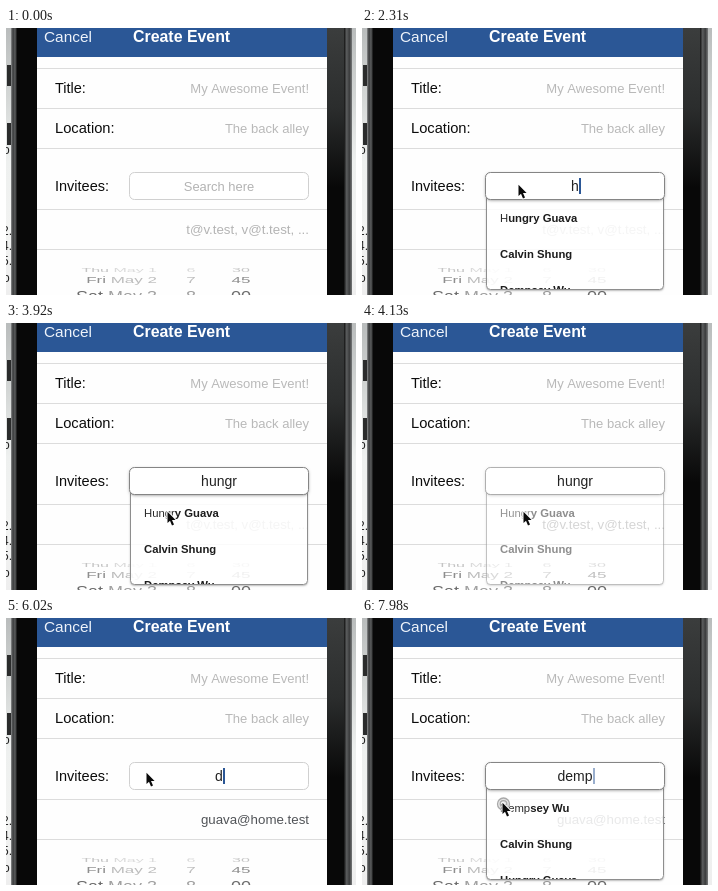
Write an HTML page with a canvas that moves like this. It is 350x267 px and loops after 8 s.

```html
<!DOCTYPE html>
<html lang="en">
<head>
<meta charset="utf-8">
<title>Create Event</title>
<style>
html, body { margin: 0; width: 100%; height: 100%; overflow: hidden; background: #fff; }
canvas { display: block; width: 350px; height: 267px; }
</style>
</head>
<body>
<canvas id="stage"></canvas>
<script>
const W = 350, H = 267, LOOP = 8000, STEP = 70;
const LEFT = 31, SCREEN = 290;
const FONT = '"Liberation Sans", Arial, sans-serif';
const canvas = document.getElementById('stage');
const ctx = canvas.getContext('2d');
const dpr = window.devicePixelRatio || 1;
canvas.width = W * dpr;
canvas.height = H * dpr;

const GUAVA = 'Hungry Guava', CALVIN = 'Calvin Shung', DEMPSEY = 'Dempsey Wu';

// Each search: focus time, key times, list opening and closing.
const searches = [
  { focus: 1750, keys: [2170, 2380, 2520, 2660, 3080], word: 'hungr',
    open: 2240, close: 4060, end: 4200, names: [GUAVA, CALVIN, DEMPSEY] },
  { focus: 5390, keys: [5950, 6370, 6790, 7350], word: 'demp',
    open: 6160, close: 9000, end: 9000, names: [DEMPSEY, CALVIN, GUAVA] }
];
const clicks = [[1540, 1750], [3990, 4130], [5250, 5390], [7910, 8000]];
// Pointer moves: start, end, from x, y, to x, y
const moves = [
  [840, 1050, 33, 161, 156, 156],
  [3360, 3710, 156, 156, 161, 188],
  [4340, 4690, 161, 188, 136, 155],
  [5530, 5740, 136, 155, 140, 154],
  [6930, 7420, 140, 154, 140, 184]
];

const clamp = v => Math.max(0, Math.min(1, v));
const ramp = (t, a, b) => clamp((t - a) / (b - a));
const smooth = p => p * p * (3 - 2 * p);

function rect(x, y, w, h, color) {
  ctx.fillStyle = color;
  ctx.fillRect(x, y, w, h);
}

function text(str, x, y, size, color, align = 'left', weight = 400) {
  ctx.font = `${weight} ${size}px ${FONT}`;
  ctx.textAlign = align;
  ctx.fillStyle = color;
  ctx.fillText(str, x, y);
}

// The shadow is kept outside the shape so that see-through fills stay clean.
function box(x, y, w, h, radii, fill, stroke, shadow) {
  const shape = new Path2D();
  shape.roundRect(x, y, w, h, radii);
  if (shadow) {
    const outside = new Path2D(shape);
    outside.rect(0, 0, W, H);
    ctx.save();
    ctx.clip(outside, 'evenodd');
    ctx.shadowColor = 'rgba(0,0,0,.4)';
    ctx.shadowBlur = shadow * dpr;
    ctx.shadowOffsetY = dpr;
    ctx.fillStyle = '#fff';
    ctx.fill(shape);
    ctx.restore();
  }
  ctx.fillStyle = fill;
  ctx.fill(shape);
  ctx.strokeStyle = stroke;
  ctx.lineWidth = 1;
  ctx.stroke(shape);
}

function gradient(x0, y0, x1, y1, colors) {
  const g = ctx.createLinearGradient(x0, y0, x1, y1);
  colors.forEach((c, i) => g.addColorStop(i / (colors.length - 1), c));
  return g;
}

function drawDesk() {
  rect(0, 0, W, H, gradient(0, 0, 0, H, ['#b9bcbc', '#d3d6d5', '#eef0ef', '#f2f3f2', '#eeeeee']));
  text('o', -3, 126, 12, '#222');
  ['2.', '4.', '5.'].forEach((s, i) => text(s, -4, 207 + i * 15, 12, '#222'));
  text('o', -3, 254, 12, '#222');
  rect(1, 37, 6, 21, '#2b2c2c');
  rect(1, 95, 6, 22, '#2b2c2c');
  rect(5, 0, 6, H, gradient(5, 0, 11, 0, ['#8b8d8e', '#3a3b3c', '#5c5e5f', '#111']));
  rect(11, 0, 328, H, '#080808');
  rect(321, 0, 17, H, gradient(0, 0, 0, 160, ['#3b3d3d', '#2b2d2d', '#080808']));
  rect(338, 0, 8, H, gradient(338, 0, 346, 0, ['#111', '#5c5e5f', '#3a3b3c', '#77797a']));
}

function wheelRow(weekday, date, hour, minute, y, size, squash, dark, light) {
  ctx.save();
  ctx.translate(0, y);
  ctx.scale(1, squash);
  text(date, 151, 0, size, light, 'right');
  text(weekday, 151 - ctx.measureText(' ' + date).width, 0, size, dark, 'right');
  text(hour, 185, 0, size, light, 'center');
  text(minute, 235, 0, size, dark, 'center');
  ctx.restore();
}

function drawForm(t) {
  rect(LEFT, 0, SCREEN, H, '#fefefe');
  rect(LEFT, 0, SCREEN, 29, '#2b5796');
  text('Cancel', 38, 13.5, 15.4, '#eef3fa');
  text('Create Event', 127, 13.5, 15.9, '#fff', 'left', 700);
  [40, 80, 120, 181, 221].forEach(y => rect(LEFT, y, SCREEN, 1, '#dcdcdc'));

  text('Title:', 49, 65, 14.5, '#0c0c0c');
  text('Location:', 49, 105, 14.7, '#0c0c0c');
  text('Invitees:', 49, 163, 14.5, '#0c0c0c');
  text('My Awesome Event!', 303, 65, 13.05, '#b9b9b9', 'right');
  text('The back alley', 303, 105, 13.05, '#b9b9b9', 'right');
  if (t < 4200) text('t@v.test, v@t.test, ...', 303, 206, 13.3, '#b4b4b4', 'right');
  else text('guava@home.test', 303, 206, 13.3, '#505357', 'right');

  ctx.save();
  ctx.beginPath();
  ctx.rect(LEFT, 240, SCREEN, 27);
  ctx.clip();
  wheelRow('Thu', 'May 1', '6', '30', 244, 16, .34, '#c4c4c4', '#dadada');
  wheelRow('Fri', 'May 2', '7', '45', 255, 17, .58, '#8e8e8e', '#bcbcbc');
  wheelRow('Sat', 'May 3', '8', '00', 273, 18, .85, '#6c6c6c', '#a0a0a0');
  ctx.restore();
}

function drawList(names, typed, alpha) {
  ctx.save();
  ctx.globalAlpha = alpha;
  box(124.5, 170.5, 177, 91, [0, 0, 4, 4], 'rgba(255,255,255,.87)', '#8e8e8e', 2);
  ctx.beginPath();
  ctx.rect(125, 172, 176, 89);
  ctx.clip();
  names.forEach((name, i) => {
    const n = name.toLowerCase().startsWith(typed) ? typed.length : 0;
    const y = 194 + i * 36, head = name.slice(0, n);
    text(head, 138, y, 11.3, '#2a2a2a');
    const dx = ctx.measureText(head).width;
    text(name.slice(n), 138 + dx, y, 11.3, '#1d1d1d', 'left', 700);
  });
  ctx.restore();
}

function drawField(t) {
  const s = searches.find(q => t >= q.focus && t < q.end);
  const typed = s ? s.word.slice(0, s.keys.filter(k => t >= k).length) : '';
  const alpha = s ? ramp(t, s.open - STEP, s.open + STEP) * (1 - ramp(t, s.close, s.end)) : 0;

  if (alpha) drawList(s.names, typed, alpha);
  box(123.5, 144.5, 179, 27, 5, '#fff', '#d0d0d0');
  if (alpha) {
    ctx.save();
    ctx.globalAlpha = alpha;
    box(123.5, 144.5, 179, 27, 5, '#fff', '#858585', 3);
    ctx.restore();
  }
  if (typed) text(typed, 213, 163, 14, '#222', 'center');
  else text('Search here', 213, 163, 12.95, '#b3b3b3', 'center');

  if (s && t < s.close) {
    ctx.font = `400 14px ${FONT}`;
    const x = 213 + ctx.measureText(typed).width / 2;
    const last = Math.max(s.focus, ...s.keys.filter(k => t >= k));
    const phase = (t - last) % 1000;
    ctx.globalAlpha = Math.max(1 - ramp(phase, 500, 750), ramp(phase, 920, 1000));
    rect(Math.round(x), 150, 2, 16, '#2b5796');
    ctx.globalAlpha = 1;
  }
}

function drawPointer(t) {
  if (t < moves[0][0]) return;
  const m = moves.filter(q => t >= q[0]).pop();
  const p = smooth(ramp(t, m[0], m[1]));
  const x = m[2] + (m[4] - m[2]) * p, y = m[3] + (m[5] - m[3]) * p;

  ctx.save();
  ctx.translate(x, y);
  if (clicks.some(c => t >= c[0] && t < c[1])) {
    ctx.beginPath();
    ctx.arc(1.5, 2, 6, 0, Math.PI * 2);
    ctx.fillStyle = 'rgba(160,160,160,.25)';
    ctx.fill();
    ctx.strokeStyle = '#a9a9a9';
    ctx.lineWidth = 1.3;
    ctx.stroke();
    ctx.beginPath();
    ctx.arc(1.5, 2, 3.3, 0, Math.PI * 2);
    ctx.stroke();
  }
  const arrow = new Path2D('M.5 .8V12L3 9.7L5 14.4L7 13.5L5 8.9H8.6Z');
  ctx.lineJoin = 'round';
  ctx.strokeStyle = '#fff';
  ctx.lineWidth = 2;
  ctx.stroke(arrow);
  ctx.fillStyle = '#0a0a0a';
  ctx.fill(arrow);
  ctx.restore();
}

function draw(now) {
  const t = Math.floor((now % LOOP) / STEP) * STEP;
  ctx.setTransform(dpr, 0, 0, dpr, 0, 0);
  drawDesk();
  drawForm(t);
  drawField(t);
  drawPointer(t);
}

const start = performance.now();
function tick() {
  draw(performance.now() - start);
  requestAnimationFrame(tick);
}
tick();
</script>
</body>
</html>
```
